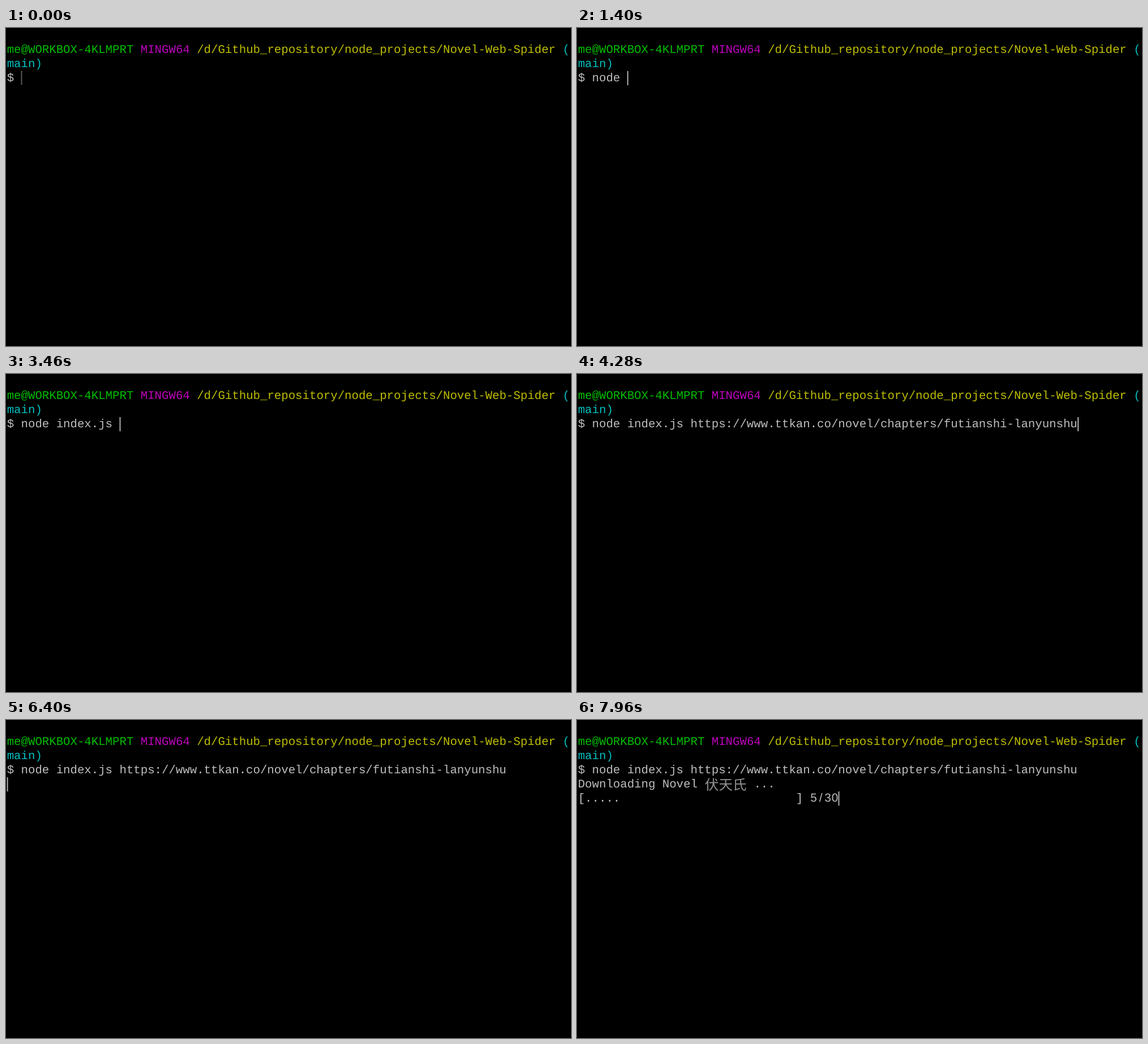
Write an HTML page that moves like this. It is 998 by 561 pixels and loops after 8 s.

```html
<!DOCTYPE html>
<html lang="en">
<head>
<meta charset="utf-8">
<title>Terminal</title>
<style>
html, body { margin: 0; width: 100%; height: 100%; overflow: hidden; background: #000; }
svg { display: block; width: 998px; height: 561px; }
text { font: 20.713px "Liberation Mono", monospace; white-space: pre; fill: #bfbfbf; text-rendering: geometricPrecision; }
.user { fill: #00bf00; }
.system { fill: #bf00bf; }
.path { fill: #bfbf00; }
.branch { fill: #00bfbf; }
#title { font: 24.6px "Noto Sans CJK SC", "Noto Sans CJK", sans-serif; fill: #929292; }
#count { font-family: "Liberation Sans", sans-serif; text-anchor: middle; }
#caret { stroke: #c8c8c8; stroke-width: 1.7; }
#mouse { fill: none; stroke: #f4f4f4; stroke-width: 2; }
</style>
</head>
<body>
<svg viewBox="0 0 998 561">
  <rect width="998" height="561" fill="#000"/>
  <text x="1.7" y="44"><tspan class="user">me@WORKBOX-4KLMPRT</tspan> <tspan class="system">MINGW64</tspan> <tspan class="path">/d/Github_repository/node_projects/Novel-Web-Spider</tspan> <tspan class="branch">(</tspan></text>
  <text x="1.7" y="69" class="branch">main)</text>
  <text id="command" x="1.7" y="94"></text>
  <g id="output">
    <text x="1.7" y="119">Downloading Novel</text>
    <text id="title" x="225.8" y="123.3">伏天氏</text>
    <text x="312.4" y="119">...</text>
    <text id="bar" x="1.7" y="144"></text>
    <text id="count" y="144"></text>
  </g>
  <line id="caret"/>
  <path id="mouse" d="M-6-13h4.5l1.5 1.5 1.5-1.5H6M-6 13h4.5L0 11.5 1.5 13H6M0-12V12"/>
</svg>
<script>
const LOOP = 8000, CELL = 12.43, LEFT = 1.7, BLINK = 530;
const FOCUS = 420, ENTER = 4860, START = 6520;
const URL_TEXT = "https://www.ttkan.co/novel/chapters/futianshi-lanyunshu";
const ticks = [6760, 7060, 7340, 7600, 7880];

// [time, text]; "<" is a backspace
const keys = [
  [880, "n"], [1000, "o"], [1120, "d"], [1220, "e"], [1340, " "],
  [1720, "i"], [1840, "n"], [1960, "d"], [2080, "e"], [2200, "x"], [2360, " "],
  [2780, "<"], [2920, "."], [3060, "j"], [3160, "s"], [3320, " "], [3900, URL_TEXT]
];

const el = id => document.getElementById(id);
const [command, output, bar, count, caret, mouse] =
  ["command", "output", "bar", "count", "caret", "mouse"].map(el);
const show = (node, on) => node.setAttribute("visibility", on ? "visible" : "hidden");
const put = (node, attrs) => {
  for (const name in attrs) node.setAttribute(name, attrs[name]);
};

put(count, { x: [33, 34, 35, 36].map(c => LEFT + (c + 0.5) * CELL).join(" ") });

function typed(t) {
  return keys.filter(k => k[0] <= t)
    .reduce((s, k) => k[1] === "<" ? s.slice(0, -1) : s + k[1], "$ ");
}

function drawCaret(t, col, row) {
  const events = [FOCUS, ...keys.map(k => k[0]), ENTER, START, ...ticks];
  const last = Math.max(0, ...events.filter(e => e <= t));
  const x = LEFT + 0.9 + col * CELL, y = 76 + (row - 2) * 25;
  put(caret, { x1: x, x2: x, y1: y, y2: y + 25, "stroke-dasharray": t < FOCUS ? "1.25 1.25" : "none" });
  show(caret, t < FOCUS || Math.floor((t - last) / BLINK) % 2 === 0);
}

function drawMouse(t) {
  const p = Math.min(1, Math.max(0, (t - 20) / 360));
  const ease = 1 - (1 - p) ** 3;
  put(mouse, { transform: `translate(${1006 - 659 * ease} ${170 + 79 * ease})` });
  show(mouse, t >= 20 && t < keys[0][0]);
}

function render(t) {
  const line = typed(t);
  const done = ticks.filter(e => e <= t).length;
  command.textContent = line;
  bar.textContent = "[" + ".".repeat(done).padEnd(30) + "]";
  count.textContent = done + "/30";
  show(output, t >= START);
  if (t >= START) drawCaret(t, 37, 4);
  else if (t >= ENTER) drawCaret(t, 0, 3);
  else drawCaret(t, line.length, 2);
  drawMouse(t);
}

const begin = performance.now();
function frame() {
  render((performance.now() - begin) % LOOP);
  requestAnimationFrame(frame);
}
render(0);
requestAnimationFrame(frame);
</script>
</body>
</html>
```
